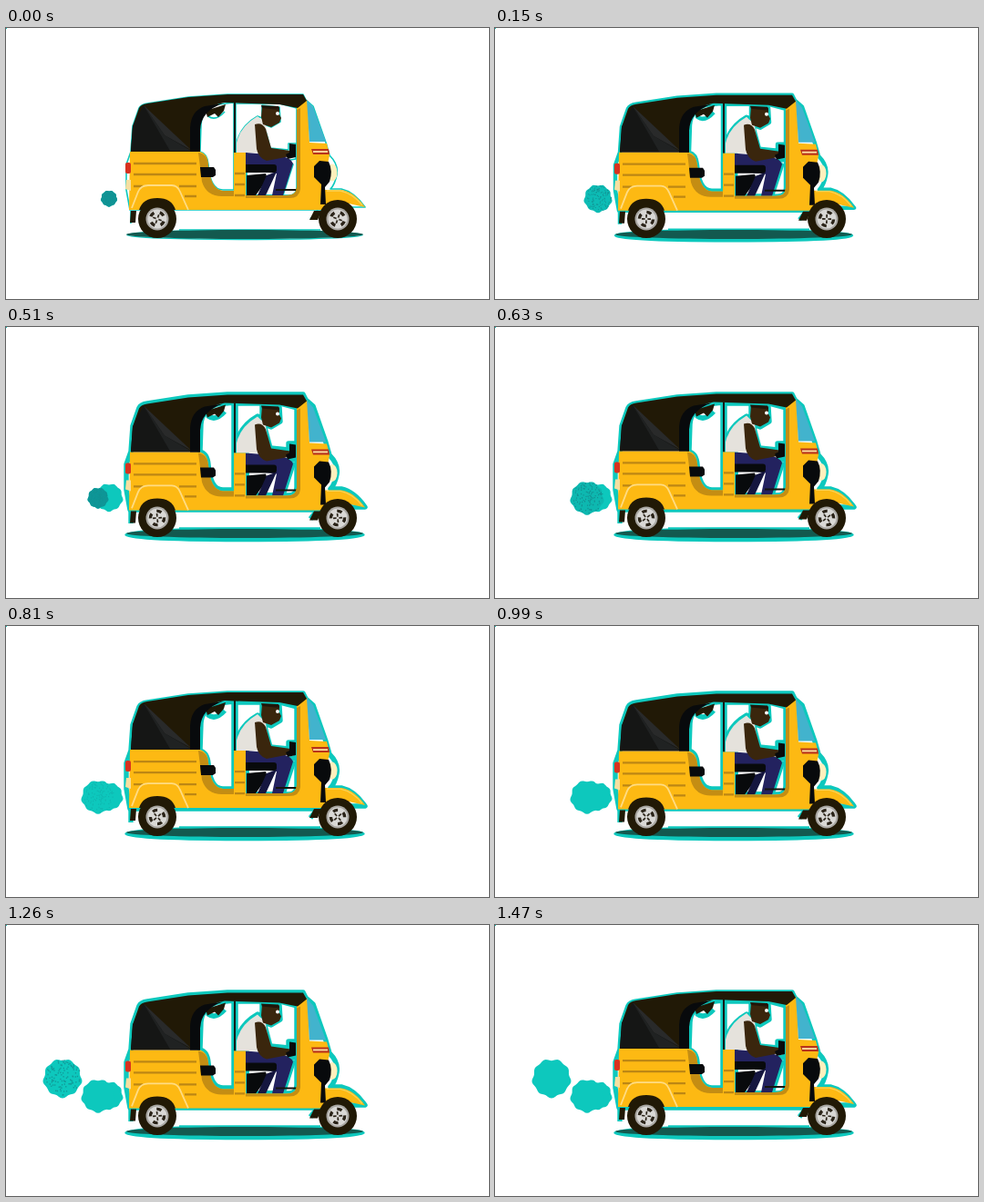
An HTML page for the animation above (1.5 s loop, 530 px wide and 298 px high).

```html
<!DOCTYPE html>
<html lang="en">
<head>
<meta charset="utf-8">
<title>Rickshaw</title>
<style>
html, body { margin: 0; width: 100%; height: 100%; overflow: hidden; background: #fff; }
svg { display: block; width: 100vw; height: 100vh; }
.black { fill: #080a0c; }
.dark { fill: #211906; }
.yellow { fill: #fdb913; }
.shade { fill: #c48d13; }
.skin { fill: #3a260d; }
.teal { fill: #0dc8bd; }
#halo { fill: none; stroke: #0dc8bd; stroke-linejoin: round; }
</style>
</head>
<body>
<svg viewBox="0 0 530 298">
  <defs>
    <path id="outline" d="M137 136L139 108L146 88Q148 84 155 83L200 76L243 73H326L329 79L337 86L351 126L355 140Q365 150 363 161T356 177H368Q382 180 394 197H376L345 200H136L132 178V150Z
      M213 136L214 106Q215 90 232 84L250 82V178H238Q224 178 222 150Q221 138 213 136Z
      M252 83H300L319 88V175Q319 184 310 184H264V137H252Z"/>
    <path id="driver" d="M281 85L300 87L301 103L291 109L283 106L290 132L310 134V127H318V144L307 146L315 150L304 184H264V157H255V150H253V126Q258 107 276 97L281 99Z"/>
    <g id="wheel">
      <circle r="21" class="dark"/>
      <circle r="12.5" fill="#a9a7a3"/>
      <circle r="10.5" fill="#d9d8d5"/>
      <g class="spin">
        <circle r="7.6" fill="none" stroke="#2b2419" stroke-width="3.4" stroke-dasharray="5.4 6.54"/>
        <path d="M-5 0H5M0-5V5" stroke="#2b2419" stroke-width="1.7"/>
        <circle r="1.6" fill="#d9d8d5"/>
      </g>
    </g>
  </defs>

  <rect width="1" height="1" class="teal"/>
  <g id="smoke"></g>
  <g id="halo">
    <use href="#outline"/>
    <use href="#driver"/>
    <ellipse cx="262" cy="227.5" rx="129" ry="5"/>
    <path d="M190 222H345M137 201V215M334 210L342 200"/>
    <path d="M222 90V97Q230 103 240 92"/>
  </g>
  <ellipse cx="262" cy="227" rx="130" ry="5" fill="#13594f"/>

  <g id="body">
    <!-- driver and seat -->
    <path class="black" d="M264 162L285 160L287 166L274 184H264Z"/>
    <path fill="#23225f" d="M263 137L300 140Q313 143 315 149L304 184H292L297 160L280 158L263 152Z"/>
    <path fill="#15163f" d="M286 162L297 158L285 184H276Z"/>
    <rect class="black" x="255" y="150" width="42" height="9" rx="3"/>
    <path fill="#e5e2dc" d="M276 97L285 106L289 137H253V126Q257 108 276 97Z"/>
    <path class="skin" d="M281 86L300 87V95L302 99L300 104L291 109L282 106L280 98Z"/>
    <path fill="#21160a" d="M280 85L299 86L300 90L281 88Z"/>
    <circle cx="298" cy="94" r="2" fill="#fff"/>
    <path class="skin" d="M273 106Q281 103 285 111L291 132L312 135V141L286 146Q277 143 275 133Z"/>
    <path class="black" d="M311 127L318 128V142L309 144L307 139L311 137Z"/>
    <path d="M251 82V137M296 178H320" stroke="#14140f" stroke-width="2"/>
    <path class="dark" d="M219 91L241 84L239 91L233 98L229 94L221 98Z"/>

    <!-- yellow shell -->
    <path class="dark" d="M137 201H143L142 214H136ZM333 211L338 201H346L342 211Z"/>
    <path class="yellow" d="M136 136H213Q221 138 222 150Q224 178 238 179H250V137H263V184H308Q319 184 319 175V86L331 79L333 126L352 127L355 140L347 178H368Q382 180 394 197L376 193L345 200H135Z"/>
    <path class="shade" d="M211 137Q221 138 222 150Q224 178 238 179H250V185H237Q220 185 215 169Z"/>
    <path class="shade" d="M319 90L323 88V177Q322 187 311 187H263V184H308Q319 184 319 175Z"/>
    <path d="M140 149H209M140 161H209M140 174H150M190 174H209M196 185H209M251 160H262M251 172H262M251 184H262" stroke="#bd8714" stroke-width="2.3"/>
    <path d="M138 198L145 180Q148 173 156 173H182Q188 173 191 180L200 200" fill="#fdb913" stroke="#ffdc83" stroke-width="1.8"/>
    <path class="dark" d="M146 200Q150 187 166 187T186 200Z"/>
    <path class="black" d="M213 153H228L230 156V162L227 164H214Z"/>
    <rect x="131" y="148" width="6" height="12" rx="2" fill="#d8311f"/>
    <path fill="#f6dfa0" d="M132 167H137V179L131 177Z"/>

    <!-- canopy -->
    <path class="dark" d="M137 136L139 108L146 88Q148 84 155 83L200 76L243 73H326L330 80L320 88L300 84L240 82Q225 84 218 93Q213 99 213 112V136Z"/>
    <path fill="#151615" d="M151 85L139 108L137 135H201Z"/>
    <path fill="#292a2a" d="M151 85L203 134L174 118Z"/>
    <path fill="#202222" d="M151 85L174 118L203 135H180Z"/>
    <path class="black" d="M202 136V110Q203 91 218 86L238 83Q214 91 213 112V136Z"/>

    <!-- front -->
    <path fill="#42b3cd" d="M330 79L337 87L351 125L333 125Z"/>
    <path fill="#b8331c" d="M335 133H354L355 139H337Z"/>
    <path d="M337 136H353" stroke="#ffe3a3" stroke-width="1.8"/>
    <ellipse cx="358" cy="159" rx="5.5" ry="9.5" fill="#fff0bd"/>
    <path class="black" d="M338 152L344 146L354 147Q359 157 355 169L350 175L351 194H345L346 172L338 164Z"/>
    <path d="M352 179H367Q381 182 391 195" fill="none" stroke="#ffd255" stroke-width="1.3"/>
  </g>
  <use href="#wheel" x="166" y="210"/>
  <use href="#wheel" x="364" y="210"/>
</svg>
<script>
const LOOP = 1500, STEP = 30, PUFF_GAP = 500;
const $ = s => document.querySelector(s);
const clamp = v => Math.max(0, Math.min(1, v));

let seed = 7;
const random = () => (seed = seed * 16807 % 2147483647) / 2147483647;

function add(parent, tag, attrs) {
  const el = document.createElementNS('http://www.w3.org/2000/svg', tag);
  for (const name in attrs) el.setAttribute(name, attrs[name]);
  return parent.appendChild(el);
}

// Unit-radius cloud with a bumpy rim
function cloud() {
  const points = [];
  for (let i = 0; i < 60; i++) {
    const a = i * Math.PI / 30, r = .96 + .04 * Math.sin(a * 9) + .02 * Math.sin(a * 5);
    points.push((r * Math.cos(a)).toFixed(3) + ' ' + (r * Math.sin(a)).toFixed(3));
  }
  return 'M' + points.join('L') + 'Z';
}

function speckles(count) {
  let d = '';
  for (let i = 0; i < count; i++) {
    const a = random() * 2 * Math.PI, r = .92 * Math.sqrt(random());
    d += `M${(r * Math.cos(a)).toFixed(3)} ${(r * Math.sin(a)).toFixed(3)}h.06`;
  }
  return d;
}

const puffs = [[113, 187.5, 15.5], [101, 188, 18.5], [62, 168.5, 21.5]].map(([x, y, r], i) => {
  const el = add($('#smoke'), 'g', {});
  add(el, 'path', { d: cloud(), class: 'teal' });
  const fresh = add(el, 'path', { d: cloud(), fill: '#0f9495' });
  const grain = add(el, 'path', { d: speckles(110), stroke: '#128f90', 'stroke-width': .07 });
  return { x, y, r, el, fresh, grain, start: i * PUFF_GAP };
});

function draw(t) {
  const settle = clamp(t / 200);
  $('#body').setAttribute('transform', `translate(0 ${1 - Math.cos(2 * Math.PI * t / 750)})`);
  $('#halo').setAttribute('transform', `translate(0 ${settle})`);
  $('#halo').setAttribute('stroke-width', 1.6 + 3.8 * settle);
  $('.spin').setAttribute('transform', `rotate(${20 + 720 * t / LOOP})`);
  for (const p of puffs) {
    const age = t - p.start;
    p.el.setAttribute('visibility', age < 0 ? 'hidden' : 'visible');
    const size = p.r * (.58 + .42 * clamp(age / 100));
    p.el.setAttribute('transform', `translate(${p.x} ${p.y}) scale(${size})`);
    p.fresh.setAttribute('opacity', clamp(1 - age / 190));
    p.grain.setAttribute('opacity', clamp((340 - age) / 100));
  }
}

function frame() {
  draw(Math.floor(performance.now() % LOOP / STEP) * STEP);
  requestAnimationFrame(frame);
}
frame();
</script>
</body>
</html>
```
